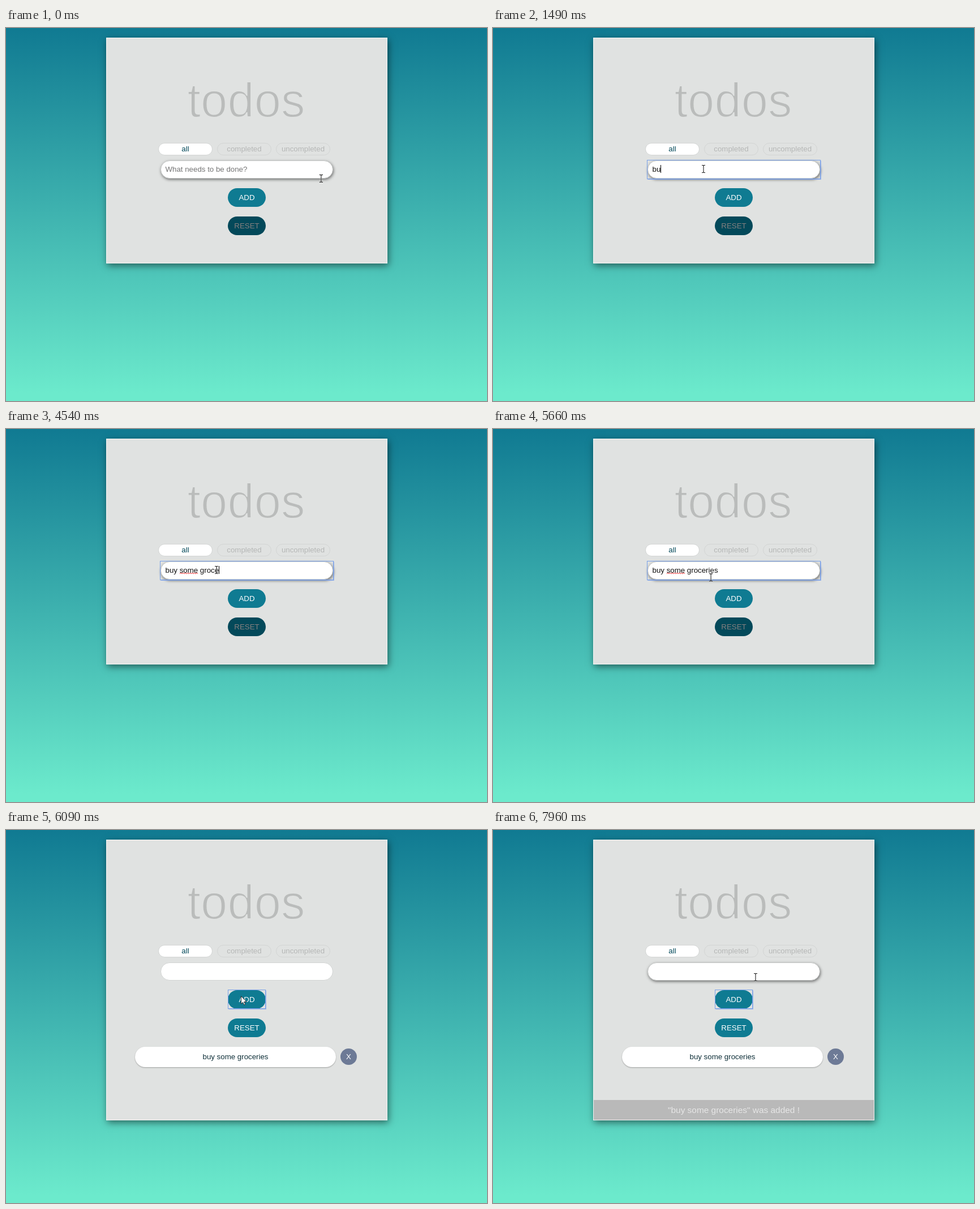
An HTML page that plays this animation: 850x659 px, repeating every 8000 ms.

```html
<!DOCTYPE html>
<html lang="en">
<head>
<meta charset="utf-8">
<title>todos</title>
<style>
  html, body { margin: 0; width: 100%; height: 100%; overflow: hidden; }
  body {
    position: relative;
    background: linear-gradient(#107a92, #6ceacc 98%);
    font: 13.3px "Liberation Sans", Arial, sans-serif;
  }
  body * { position: absolute; box-sizing: border-box; }
  .pill { text-align: center; white-space: pre; }

  #panel {
    left: 177px; top: 17px; width: 497px; height: 399px;
    background: #e0e2e1; border: 1px solid #f3f5f4;
    box-shadow: 2px 4px 12px rgba(0, 0, 0, .5);
  }
  #panel.tall { height: 496px; }
  h1 {
    left: 320.5px; top: 85px; margin: 0; color: #babcbb;
    font-size: 85px; font-weight: 400; line-height: 85px;
    -webkit-text-stroke: 2px #e0e2e1;
  }

  .tab {
    top: 203px; width: 96px; height: 22px; line-height: 20px;
    border: 1px solid #d3d5d4; border-radius: 11px; color: #b5b7b6;
  }
  .tab.on { background: #fff; color: #03495a; }

  #field {
    left: 273px; top: 234px; width: 305px; height: 32px;
    background: #fff; border: 1px solid #d2d4d3; border-radius: 16px;
  }
  #field.hover { box-shadow: 1px 2px 5px rgba(0, 0, 0, .5); border-color: #c4c6c5; }
  #line { left: 281.5px; top: 240px; line-height: 20px; white-space: pre; color: #111; }
  #line span { position: static; }
  #line.hint { color: #757575; }
  #caret { left: 281.5px; top: 242px; width: 1px; height: 14px; background: #000; }
  #wave { left: 307px; top: 253px; }

  .btn {
    left: 392px; width: 67px; height: 33px; line-height: 33px;
    border-radius: 16.5px; background: #0f7b92; color: #fff;
  }
  #add { top: 283px; }
  #add.hover { box-shadow: 0 3px 9px rgba(20, 30, 70, .5); }
  #reset { top: 332.5px; }
  #reset.off { background: #03495a; color: #858080; }
  .ring { border: 1px solid #78a0e8; box-shadow: 0 0 1px 0.5px rgba(110, 150, 235, .6); }
  #fieldRing { left: 272px; top: 233px; width: 307px; height: 34px; }
  #addRing { left: 392px; top: 282px; width: 67px; height: 34px; }

  #item {
    left: 228px; top: 383px; width: 355px; height: 36px; line-height: 35px;
    border-radius: 18px; background: #fff; color: #0e2f38;
    box-shadow: 0 1px 2px rgba(0, 0, 0, .3);
  }
  #remove {
    left: 591px; top: 386px; width: 29px; height: 29px; line-height: 29px;
    border-radius: 50%; background: #6d7a96; color: #fff;
  }
  #notice {
    left: 178px; top: 477px; width: 495px; height: 35px; line-height: 36px;
    background: #b9b9b9; color: #e6e6e6; font-size: 15.43px;
  }
  #click {
    width: 20px; height: 20px; margin: -10px; border-radius: 50%;
    background: #85b83b; opacity: .93;
  }
  #mouse { left: 0; top: 0; width: 1px; height: 1px; overflow: visible; }
</style>
</head>
<body>
<div id="panel"></div>
<h1>todos</h1>
<div class="pill tab on" style="left:269px">all</div>
<div class="pill tab" style="left:373px">completed</div>
<div class="pill tab" style="left:477px">uncompleted</div>

<div id="field"></div>
<div id="fieldRing" class="ring"></div>
<div id="line"></div>
<div id="caret"></div>
<svg id="wave" width="33" height="4"><path fill="none" stroke="#e33" stroke-width="1"/></svg>

<div id="add" class="pill btn">ADD</div>
<div id="addRing" class="ring"></div>
<div id="reset" class="pill btn">RESET</div>
<div id="item" class="pill">buy some groceries</div>
<div id="remove" class="pill">X</div>
<div id="notice" class="pill">"buy some groceries" was added !</div>

<div id="click"></div>
<svg id="mouse">
  <g id="arrow">
    <path d="M.5 .5V14.2L3.6 11.3L5.7 15.9L7.8 15L5.8 10.5H10Z" fill="#fff" stroke="#2b2f33"/>
  </g>
  <g id="beam" fill="none">
    <path d="M-3 -6.5H-1L0 -5.5L1 -6.5H3M0 -5.5V5.5M-3 6.5H-1L0 5.5L1 6.5H3" stroke="#fff" stroke-width="2.4" opacity=".6"/>
    <path d="M-3 -6.5H-1L0 -5.5L1 -6.5H3M0 -5.5V5.5M-3 6.5H-1L0 5.5L1 6.5H3" stroke="#222" stroke-width="1.1"/>
  </g>
  <g id="hand">
    <path d="M-1 1Q.3 -1 1.6 1V7Q3 5.8 4 7.5Q5.7 6.5 6.5 8.2Q8.6 7.6 9 9.7V13Q8.6 15 7.5 17V19.3H.5V17.2Q-2 14 -4 10.5Q-3 8.5 -1 11Z"
      fill="#fff" stroke="#1d2b30" stroke-linejoin="round"/>
    <path d="M1.6 7V10.5M4 8V10.5M6.5 8.5V10.5" stroke="#1d2b30" stroke-width=".8"/>
  </g>
</svg>

<script>
const LOOP = 8000;
const FOCUS = 520, PRESS = 5990, ADDED = 6090, REHOVER = 6230;
const PLACEHOLDER = "What needs to be done?";

// "<" is a backspace
const keys = "buy some goro<<<roceries";
const keyTimes = [
  1310, 1490, 1560, 1630, 1810, 1880, 1950, 2020, 2090, 2240, 2390, 2500,
  2610, 3000, 3100, 3200, 3300, 3410, 4290, 4540, 4660, 4840, 4940, 5040
];

// time, x, y
const path = [
  [0, 557, 266], [60, 550, 261], [180, 490, 242], [300, 420, 235],
  [400, 380, 242], [460, 372, 249], [5530, 372, 249], [5760, 395, 272],
  [5930, 415, 293], [7730, 415, 293], [7840, 436, 281], [7950, 464, 260]
];

const $ = id => document.getElementById(id);
const show = (id, on) => { $(id).style.display = on ? "" : "none"; };
const within = (t, a, b) => t >= a && t < b;

function pointer(t) {
  const i = path.findIndex(p => p[0] > t);
  if (i < 0) return path[path.length - 1].slice(1);
  const [t0, x0, y0] = path[i - 1], [t1, x1, y1] = path[i];
  const k = (t - t0) / (t1 - t0);
  return [x0 + (x1 - x0) * k, y0 + (y1 - y0) * k];
}

function typed(t) {
  let text = "", last = FOCUS;
  keyTimes.forEach((at, i) => {
    if (t < at) return;
    text = keys[i] === "<" ? text.slice(0, -1) : text + keys[i];
    last = at;
  });
  return { text, last };
}

function drawField(t) {
  const { text, last } = typed(t);
  const focused = within(t, FOCUS, PRESS);
  const hint = t < keyTimes[0];
  const line = $("line");
  const value = t >= ADDED ? "" : hint ? PLACEHOLDER : text;
  if (line.textContent !== value) line.textContent = value;
  line.classList.toggle("hint", hint);
  $("caret").style.left = 281.5 + (hint ? 0 : line.getBoundingClientRect().width) + "px";
  show("caret", focused && (t - last) % 1080 < 540);
  show("wave", focused && t >= 2160);
  show("fieldRing", focused);
}

function drawPointer(t) {
  const [x, y] = pointer(t);
  const overField = x > 273 && x < 578 && y > 234 && y < 266;
  const overAdd = x > 392 && x < 459 && y > 283 && y < 316 && !within(t, ADDED, REHOVER);
  $("field").classList.toggle("hover", overField);
  $("add").classList.toggle("hover", overAdd);
  show("beam", overField);
  show("hand", overAdd);
  show("arrow", !overField && !overAdd);
  $("mouse").style.transform = `translate(${x}px, ${y}px)`;
  $("click").style.transform = `translate(${x}px, ${y}px)`;
  show("click", within(t, FOCUS, 630) || within(t, PRESS, ADDED));
}

function draw(t) {
  const added = t >= ADDED;
  drawField(t);
  drawPointer(t);
  show("addRing", t >= PRESS);
  show("item", added);
  show("remove", added);
  $("panel").classList.toggle("tall", added);
  $("reset").classList.toggle("off", !added);
  $("notice").style.opacity = Math.min(1, Math.max(0, (t - 6150) / 320));
}

let zigzag = "M0 3";
for (let x = 2; x <= 32; x += 2) zigzag += `L${x} ${x % 4 ? 1 : 3}`;
document.querySelector("#wave path").setAttribute("d", zigzag);

const start = performance.now();
function tick() {
  draw((performance.now() - start) % LOOP);
  requestAnimationFrame(tick);
}
tick();
</script>
</body>
</html>
```
